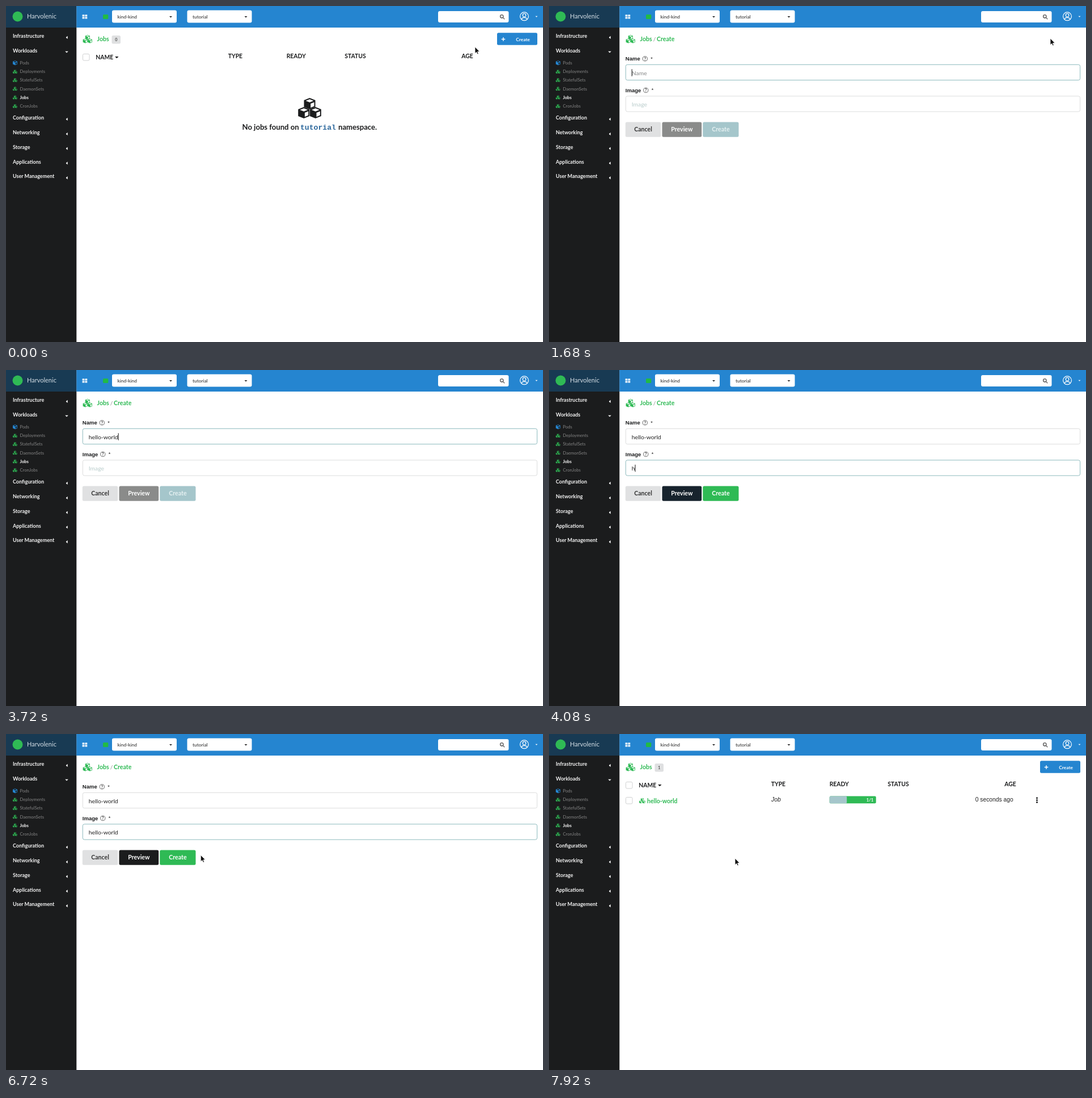
These frames come from a looping animation (947x592 px, 8 s). An HTML page:

```html
<!DOCTYPE html>
<html lang="en">
<head>
<meta charset="utf-8">
<title>Job creation</title>
<style>
  html, body { margin: 0; width: 100%; height: 100%; overflow: hidden; background: #fff; }
  svg { display: block; width: 947px; height: 592px; font-family: Lato, sans-serif; }
  text { white-space: pre; }
  .b { font-weight: 700; }
  .sans { font-family: "Liberation Sans", Arial, sans-serif; }
  .mono { font-family: "Liberation Mono", "Courier New", monospace; }
</style>
</head>
<body>
<svg id="stage" viewBox="0 0 947 592" xmlns="http://www.w3.org/2000/svg"></svg>
<script>
const LOOP = 8000, STEP = 120;
const GREEN = '#2fba55', BLUE = '#2585d0', DARK = '#1b1c1d', PALE = '#a5c6cb';
const WORD = 'hello-world';

const rect = (x, y, w, h, fill, r = 0, extra = '') =>
  `<rect x="${x}" y="${y}" width="${w}" height="${h}" rx="${r}" fill="${fill}" ${extra}/>`;
const text = (x, y, size, fill, str, cls = '', extra = '') =>
  `<text x="${x}" y="${y}" font-size="${size}" fill="${fill}" class="${cls}" ${extra}>${str}</text>`;
const middle = 'text-anchor="middle"';
const caretDown = (x, y, w, fill) =>
  `<path d="M${x - w / 2} ${y - w / 4}h${w}l${-w / 2} ${w / 2}z" fill="${fill}"/>`;
const caretLeft = (x, y, fill) => `<path d="M${x} ${y}l3 -2.7v5.4z" fill="${fill}"/>`;
const checkbox = y => rect(135.5, y + .5, 11.5, 11.5, '#fff', 2, 'stroke="#d0d1d2"');

const cube = (x, y, s, fill) => `<path transform="translate(${x} ${y}) scale(${s})" fill="${fill}"
  fill-rule="evenodd" d="M0-10 10-6V6L0 10-10 6V-6ZM0-7.8 7-5 0-2.3-7-5ZM1.7 0 8-2.6V4.6L1.7 7.2Z"/>`;
// Three stacked cubes, w pixels wide, centred on (x, y).
const cubes = (x, y, w, fill) => {
  const s = w / 41;
  return cube(x, y - 8 * s, s, fill) + cube(x - 10.3 * s, y + 8 * s, s, fill) +
    cube(x + 10.3 * s, y + 8 * s, s, fill);
};

function sidebar() {
  const sections = [['Infrastructure', 56], ['Workloads', 82], ['Configuration', 200],
    ['Networking', 226], ['Storage', 251.7], ['Applications', 277.5], ['User Management', 303.4]];
  const kinds = ['Pods', 'Deployments', 'StatefulSets', 'DaemonSets', 'Jobs', 'CronJobs'];
  return rect(0, 0, 124.3, 592, DARK) + rect(0, 0, 124.3, 38, '#183a53') +
    `<circle cx="20.5" cy="18.5" r="9" fill="${GREEN}"/>` +
    text(37, 22.3, 11, '#d5dee5', 'Harvolenic') +
    sections.map(([name, y]) => text(12, y, 9, '#f4f4f4', name, 'b') +
      (name === 'Workloads' ? caretDown(107, y - .8, 5.6, '#fff') : caretLeft(105.6, y - .6, '#fff'))).join('') +
    kinds.map((name, i) => {
      const y = 103 + i * 15.2, active = name === 'Jobs';
      return (i ? cubes(16, y - 2.8, 8, GREEN) : cube(16, y - 2.8, .4, BLUE)) +
        text(24.5, y, 7.65, active ? '#fff' : '#858585', name, active ? 'b' : '');
    }).join('');
}

function topbar() {
  const select = (x, label) => rect(x, 7.5, 114, 22, '#fff', 3) +
    text(x + 9.5, 22, 8.4, '#222', label) + caretDown(x + 103.5, 19.2, 5, '#222');
  const tiles = [[134.5, 15.3], [139.3, 15.3], [134.5, 19.3], [139.3, 19.3]];
  return rect(124.3, 0, 823, 38, BLUE) +
    tiles.map(([x, y]) => rect(x, y, 4, 3.3, '#e8f2fa', .5)).join('') +
    rect(171, 15, 9.3, 8, '#21ba45', 1.5) +
    select(187, 'kind-kind') + select(319.5, 'tutorial') +
    rect(762, 9, 124.5, 20, '#fff', 3) +
    `<g fill="none" stroke="#555" stroke-width="1.3"><circle cx="874.3" cy="18.3" r="2.7"/>
      <path d="M876.4 20.4l2.8 2.8"/></g>
    <g fill="none" stroke="#fff" stroke-width="1.2"><circle cx="914" cy="18.3" r="7.4"/>
      <circle cx="914" cy="16.2" r="2.8"/><path d="M909 23.4q1-3 5-3t5 3"/></g>` +
    caretDown(935.5, 18.7, 4, '#fff');
}

function listPage() {
  const heads = [['TYPE', 391.7], ['READY', 494.7], ['STATUS', 597.3], ['AGE', 803.2]];
  return text(160.5, 62, 10.6, GREEN, 'Jobs', 'b') +
    rect(186.5, 52, 15.5, 14.5, '#dfe0e1', 2.5) +
    text(194.3, 62, 7.2, '#555', '0', 'b', middle + ' id="count"') +
    rect(866, 47.3, 71, 21.5, BLUE, 2.5, 'id="newJob"') +
    `<path d="M873.7 58.5h6.6M877 55.2v6.6" stroke="#fff" stroke-width="1.5"/>` +
    text(911.7, 61.5, 8.4, '#fff', 'Create', 'b', middle) +
    checkbox(84) + text(158.3, 94, 10.4, DARK, 'NAME', 'b') + caretDown(195.3, 90.5, 6.5, DARK) +
    heads.map(([name, x]) => text(x, 91.7, 10.4, DARK, name, 'b')).join('') +
    `<g id="empty">${cubes(535.5, 180, 41, DARK)}` +
    text(416.5, 218, 13.1, DARK, 'No jobs found on', 'b') +
    text(519, 218, 13.1, '#2a669b', 'tutorial', 'b mono') +
    text(586, 218, 13.1, DARK, 'namespace.', 'b') + `</g>
    <g id="row">${checkbox(111)}${cubes(164.5, 117.5, 11, GREEN)}` +
    text(173, 121.5, 10.5, GREEN, WORD, 'b') +
    text(392, 119.3, 10.4, '#222', 'Job', 'sans', 'font-style="italic"') +
    rect(494.7, 109.5, 82, 12.7, GREEN, 2) + rect(494.7, 109.5, 30.5, 12.7, PALE, 2) +
    text(572, 118.6, 7.5, '#fff', '1/1', 'b', 'text-anchor="end"') +
    text(751.7, 119.3, 10.3, '#222', '0 seconds ago', 'sans') +
    [112.8, 116.5, 120.2].map(y => `<circle cx="860.5" cy="${y}" r="1.5" fill="${DARK}"/>`).join('') + '</g>';
}

function formPage() {
  const field = (id, label, y, helpX) =>
    text(134.8, y - 7, 9.5, DARK, label, 'b sans') +
    `<circle cx="${helpX}" cy="${y - 10.4}" r="4.1" fill="none" stroke="#444" stroke-width=".8"/>` +
    text(helpX, y - 7.8, 7, '#333', '?', 'b', middle) +
    text(helpX + 10, y - 7.5, 9, '#222', '*', 'sans') +
    rect(135.3, y, 801.3, 27.3, '#fff', 3, `id="${id}Box"`) +
    text(145.7, y + 18.2, 10.4, '#222', '', '', `id="${id}Text"`) +
    rect(0, y + 8, 1, 12.5, '#111', 0, `id="${id}Caret"`);
  const button = (id, x, w, fill, ink, label) => rect(x, 204.5, w, 26.3, fill, 2.5, `id="${id}"`) +
    text(x + w / 2, 221.2, 10.6, ink, label, 'b', `${middle} id="${id}Label"`);
  return text(160.5, 62, 10.6, GREEN, 'Jobs', 'b') + text(183.7, 62, 10, '#888', '/') +
    text(190, 62, 10.6, GREEN, 'Create', 'b') +
    field('name', 'Name', 103.3, 169.3) + field('image', 'Image', 158.8, 170.8) +
    button('cancel', 134.8, 62.5, '#e0e1e2', '#333', 'Cancel') +
    button('preview', 199.5, 69.7, DARK, '#fff', 'Preview') +
    button('create', 271.3, 63.2, GREEN, '#fff', 'Create') +
    `<path id="spinner" d="M0-6A6 6 0 0 1 5.2 3" fill="none" stroke="#fff" stroke-width="1.5"/>`;
}

const stage = document.getElementById('stage');
stage.innerHTML = rect(0, 0, 947, 592, '#fff') + sidebar() + topbar() +
  cubes(143.8, 58.2, 16.5, GREEN) +
  `<g id="list">${listPage()}</g><g id="form">${formPage()}</g>
  <path id="cursor" d="M0 0V11.5L2.7 9.2 4.4 13 6.3 12.2 4.6 8.5 8 8.2Z"
    fill="#111" stroke="#fff" stroke-width=".8"/>`;

const ui = {};
stage.querySelectorAll('[id]').forEach(el => ui[el.id] = el);
const show = (el, on) => el.setAttribute('visibility', on ? 'inherit' : 'hidden');
const fill = (el, color) => el.setAttribute('fill', color);

const OPEN = 1560, TYPE_NAME = 2400, TAB = 3840, TYPE_IMAGE = 4080;
const WAKE = 5880, SUBMIT = 7200, DONE = 7680;

// Cursor stops: time, x, y.
const path = [[600, 827, 72], [1200, 884, 57], [WAKE, 884, 57], [6240, 466, 168], [6960, 328, 219]];

function cursorAt(t) {
  const i = path.findIndex(p => p[0] > t);
  if (i < 0) return path[path.length - 1].slice(1);
  if (!i) return path[0].slice(1);
  const [t0, x0, y0] = path[i - 1], [t1, x1, y1] = path[i];
  const u = (t - t0) / (t1 - t0);
  const k = t > 6240 ? 1 - (1 - u) ** 2 : u * u * (3 - 2 * u);
  return [x0 + (x1 - x0) * k, y0 + (y1 - y0) * k];
}

const typed = (t, start) =>
  WORD.slice(0, Math.max(0, Math.min(WORD.length, Math.floor((t - start) / STEP) + 1)));

function drawField(id, hint, value, focused, caretOn) {
  const label = ui[id + 'Text'], caret = ui[id + 'Caret'];
  ui[id + 'Box'].setAttribute('stroke', focused ? '#8dbabd' : '#dcdddd');
  label.textContent = value || hint;
  fill(label, value ? '#222' : focused ? '#87898a' : '#b9cccb');
  caret.setAttribute('x', 145.7 + (value ? label.getComputedTextLength() : 0));
  show(caret, focused && caretOn);
}

function render(ms) {
  const t = Math.floor(ms / STEP) * STEP;
  const inForm = t >= OPEN && t < DONE, done = t >= DONE, loading = t >= SUBMIT;

  show(ui.list, !inForm);
  show(ui.form, inForm);
  show(ui.empty, !done);
  show(ui.row, done);
  ui.count.textContent = done ? '1' : '0';
  fill(ui.newJob, t >= 1080 && t < OPEN ? '#1678c2' : BLUE);

  const image = typed(t, TYPE_IMAGE);
  const nameBlink = t < 1920 || t >= 2280;
  const imageBlink = t < 5520 || Math.floor((t - 5520) / 480) % 2 === 1;
  drawField('name', 'Name', typed(t, TYPE_NAME), t < TAB, nameBlink);
  drawField('image', 'Image', image, t >= TAB && t < SUBMIT, imageBlink);

  fill(ui.preview, !image ? '#8a8b8a' : t < TYPE_IMAGE + STEP ? '#17232d' : DARK);
  fill(ui.create, !image ? PALE : GREEN);
  fill(ui.createLabel, image ? '#fff' : '#e6f1f2');
  show(ui.createLabel, !loading);
  show(ui.spinner, loading);
  ui.spinner.setAttribute('transform', `translate(303.5 217.5) rotate(${(t - 7440) * .6})`);

  const [x, y] = cursorAt(t);
  ui.cursor.setAttribute('transform', `translate(${x} ${y})`);
  show(ui.cursor, t < TYPE_NAME || t >= WAKE);
}

const began = performance.now();
function tick() {
  render((performance.now() - began) % LOOP);
  requestAnimationFrame(tick);
}
tick();
</script>
</body>
</html>
```
